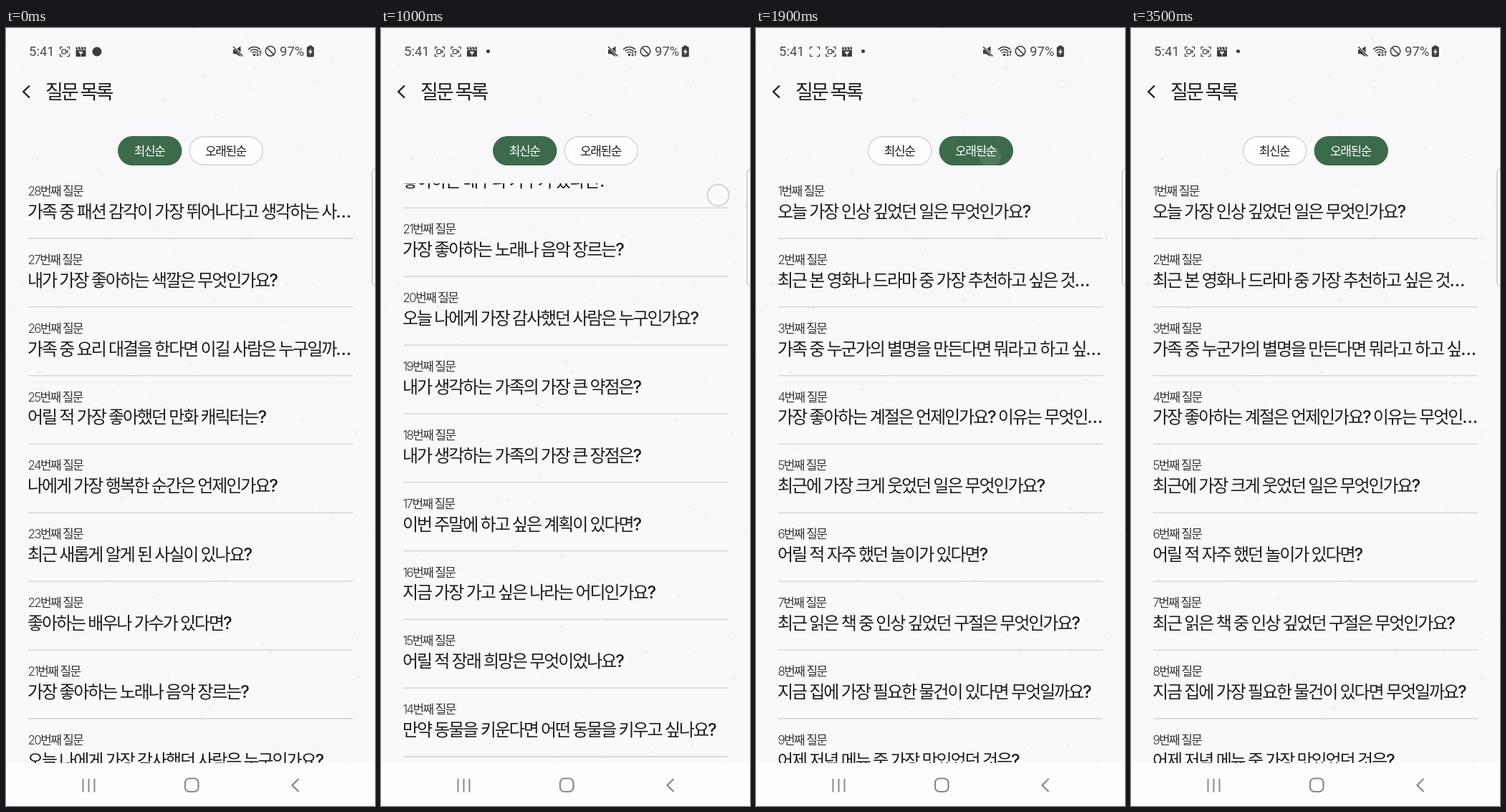
An HTML page with a canvas for the animation above (3700 ms loop, 515 px wide and 1087 px high).

```html
<!DOCTYPE html>
<html lang="ko">
<head>
<meta charset="utf-8">
<title>질문 목록</title>
<style>
  html, body { margin: 0; width: 100%; height: 100%; overflow: hidden; background: #f9f8fb; }
  canvas { display: block; width: 515px; height: 1087px; }
</style>
</head>
<body>
<canvas id="stage"></canvas>
<script>
const W = 515, H = 1087, LOOP = 3700, STEP = 100, PITCH = 95.82;
const SANS = 'Inter, "Noto Sans CJK KR", sans-serif';
const INK = '#1d1c20', ICON = '#3c3b3f', GREEN = '#3c6b4c', PAPER = '#f9f8fb';

const questions = [
  '오늘 가장 인상 깊었던 일은 무엇인가요?',
  '최근 본 영화나 드라마 중 가장 추천하고 싶은 것…',
  '가족 중 누군가의 별명을 만든다면 뭐라고 하고 싶…',
  '가장 좋아하는 계절은 언제인가요? 이유는 무엇인…',
  '최근에 가장 크게 웃었던 일은 무엇인가요?',
  '어릴 적 자주 했던 놀이가 있다면?',
  '최근 읽은 책 중 인상 깊었던 구절은 무엇인가요?',
  '지금 집에 가장 필요한 물건이 있다면 무엇일까요?',
  '어제 저녁 메뉴 중 가장 맛있었던 것은?',
  '가족 여행을 떠난다면 어디로 가고 싶나요?',
  '가장 기억에 남는 가족 여행지는?',
  '내가 가장 좋아하는 음식은 무엇인가요?',
  '가족 중 요리를 가장 잘한다고 생각하는 사람은?',
  '만약 동물을 키운다면 어떤 동물을 키우고 싶나요?',
  '어릴 적 장래 희망은 무엇이었나요?',
  '지금 가장 가고 싶은 나라는 어디인가요?',
  '이번 주말에 하고 싶은 계획이 있다면?',
  '내가 생각하는 가족의 가장 큰 장점은?',
  '내가 생각하는 가족의 가장 큰 약점은?',
  '오늘 나에게 가장 감사했던 사람은 누구인가요?',
  '가장 좋아하는 노래나 음악 장르는?',
  '좋아하는 배우나 가수가 있다면?',
  '최근 새롭게 알게 된 사실이 있나요?',
  '나에게 가장 행복한 순간은 언제인가요?',
  '어릴 적 가장 좋아했던 만화 캐릭터는?',
  '가족 중 요리 대결을 한다면 이길 사람은 누구일까…',
  '내가 가장 좋아하는 색깔은 무엇인가요?',
  '가족 중 패션 감각이 가장 뛰어나다고 생각하는 사…'
];

// [time, scroll offset]
const scroll = [[100, 0], [200, 30], [500, 294], [800, 540], [1000, 617.5], [1100, 560],
  [1300, 235], [1500, 0], [2000, 0], [2100, 90], [2300, 450], [2500, 640], [2600, 794.6],
  [2800, 930], [2900, 840], [3100, 380], [3300, 90], [3500, 0]];
// Finger strokes: [time, x, y]
const strokes = [
  [[100, 383, 850], [200, 384, 805], [500, 398, 537], [800, 444, 308], [1000, 470.5, 233.5],
    [1100, 460, 295], [1300, 415, 630], [1500, 383.5, 893]],
  [[1700, 327, 180], [1900, 327, 180]],
  [[2000, 385, 860], [2100, 390, 770], [2300, 412, 400]],
  [[2500, 400, 575], [2600, 414.5, 420], [2800, 430, 285], [2900, 425, 375], [3100, 395, 835]]
];

const canvas = document.getElementById('stage');
const ctx = canvas.getContext('2d');
const dpr = window.devicePixelRatio || 1;
canvas.width = W * dpr;
canvas.height = H * dpr;

function sample(keys, t) {
  if (t <= keys[0][0]) return keys[0].slice(1);
  for (let i = 1; i < keys.length; i++) {
    const a = keys[i - 1], b = keys[i];
    if (t <= b[0]) {
      const k = (t - a[0]) / (b[0] - a[0]);
      return a.slice(1).map((v, j) => v + (b[j + 1] - v) * k);
    }
  }
  return keys[keys.length - 1].slice(1);
}

function text(str, x, y, size, weight, spacing, color, align = 'left', family = SANS) {
  ctx.font = `${weight} ${size}px ${family}`;
  ctx.letterSpacing = spacing + 'px';
  ctx.textAlign = align;
  ctx.fillStyle = color;
  ctx.fillText(str, x, y);
}

function line(points, color, width, cap = 'butt') {
  ctx.beginPath();
  points.forEach(([x, y]) => ctx.lineTo(x, y));
  ctx.strokeStyle = color;
  ctx.lineWidth = width;
  ctx.lineCap = cap;
  ctx.lineJoin = 'miter';
  ctx.stroke();
}

function shape(points, color) {
  ctx.beginPath();
  points.forEach(([x, y]) => ctx.lineTo(x, y));
  ctx.closePath();
  ctx.fillStyle = color;
  ctx.fill();
}

function box(x, y, w, h, r, fill, stroke, width = 1) {
  ctx.beginPath();
  ctx.roundRect(x, y, w, h, r);
  if (fill) { ctx.fillStyle = fill; ctx.fill(); }
  if (stroke) { ctx.strokeStyle = stroke; ctx.lineWidth = width; ctx.stroke(); }
}

function arc(x, y, r, fill, stroke, width = 1, from = 0, to = Math.PI * 2) {
  ctx.beginPath();
  ctx.arc(x, y, r, from, to);
  if (fill) { ctx.fillStyle = fill; ctx.fill(); }
  if (stroke) { ctx.strokeStyle = stroke; ctx.lineWidth = width; ctx.lineCap = 'butt'; ctx.stroke(); }
}

function paper() {
  ctx.fillStyle = PAPER;
  ctx.fillRect(0, 0, W, H);
  let seed = 11;
  const rnd = () => (seed = (seed * 16807) % 2147483647) / 2147483647;
  for (let i = 0; i < 130; i++) {
    ctx.beginPath();
    ctx.ellipse(rnd() * W, rnd() * 1027, 0.8 + rnd() * 2.4, 0.6 + rnd() * 1.2, rnd() * 3, 0, 7);
    ctx.fillStyle = `rgba(190,186,176,${0.06 + rnd() * 0.12})`;
    ctx.fill();
  }
}

function captureIcon(x, y, filled) {
  for (const sx of [-1, 1]) for (const sy of [-1, 1]) {
    line([[x + 3 * sx, y + 6.5 * sy], [x + 6.5 * sx, y + 6.5 * sy], [x + 6.5 * sx, y + 3 * sy]], ICON, 1.2);
  }
  if (!filled) return;
  box(x - 4, y - 2.8, 5.6, 5.6, 1, null, ICON, 1.2);
  shape([[x + 1.8, y], [x + 4.6, y - 2.4], [x + 4.6, y + 2.4]], ICON);
}

function clipIcon(x, y) {
  box(x - 7, y - 6.5, 14, 3.4, 0.5, ICON);
  box(x - 7, y - 2.4, 14, 9.4, 1, ICON);
  for (const d of [-4, 0, 4]) line([[x + d - 1, y - 7], [x + d + 1, y - 2.6]], PAPER, 1.2);
  shape([[x, y + 4], [x - 3, y + 1], [x - 1.5, y - 0.8], [x, y + 0.5], [x + 1.5, y - 0.8], [x + 3, y + 1]], PAPER);
  line([[x, y + 3], [x, y + 6.5]], PAPER, 0.8);
}

function statusBar(t) {
  const roboto = 'Roboto, sans-serif', gray = '#4c4b4f';
  text('5:41', 32, 38.7, 18.5, 400, 0, gray, 'left', roboto);
  text('97%', 382, 38.7, 18.5, 400, 0, gray, 'left', roboto);
  const blinkOn = (t % 700) < 400;
  captureIcon(82, 33, blinkOn);
  if (t < 100) {
    clipIcon(104.5, 33);
    arc(127, 33, 6.5, ICON);
  } else {
    captureIcon(104.5, 33, true);
    clipIcon(127, 33);
    arc(149.5, 32.5, 2.5, ICON);
  }

  // Muted speaker
  shape([[317, 30], [320.5, 30], [327.5, 25.5], [327.5, 40], [320.5, 36], [317, 36]], ICON);
  line([[317, 25.5], [331, 40]], PAPER, 3.2);
  line([[317, 26], [330.5, 39.5]], ICON, 1.5);

  // Wireless signal with data arrows
  for (const r of [4.5, 8, 11.5]) arc(346.5, 38, r, null, ICON, 1.5, Math.PI * 1.24, Math.PI * 1.76);
  arc(346.5, 37.5, 1.8, ICON);
  line([[351.2, 32], [351.2, 39]], PAPER, 3);
  line([[351.2, 32], [351.2, 39]], ICON, 1.2);
  line([[349.5, 37], [351.2, 39.2], [353, 37]], ICON, 1);
  line([[355, 39], [355, 32]], ICON, 1.2);
  line([[353.3, 34], [355, 31.8], [356.8, 34]], ICON, 1);

  arc(369, 32.3, 6.8, null, ICON, 1.6);
  line([[364.2, 27.5], [373.8, 37.1]], ICON, 1.6);

  box(422.5, 24.5, 4.5, 3, 0.5, ICON);
  box(419.8, 26, 10, 14.5, 1.8, ICON);
  shape([[425.8, 28.3], [421.8, 34], [424.4, 34], [423.6, 38.2], [427.8, 32.2], [425.2, 32.2]], PAPER);
}

function pill(label, x, w, active) {
  if (active) box(x, 151, w, 41, 20.5, GREEN);
  else box(x + 0.7, 151.7, w - 1.4, 39.6, 19.8, '#fefdff', '#d3d2d5', 1.4);
  text(label, x + w / 2 - 0.7, 177.8, 17, 500, -1.4, active ? '#ffffff' : INK, 'center');
}

function list(offset, oldest) {
  ctx.save();
  ctx.beginPath();
  ctx.rect(0, 217, W, 811);
  ctx.clip();
  for (let i = 0; i < questions.length; i++) {
    const y = i * PITCH - offset;
    if (y < -100 || y > 820) continue;
    const n = oldest ? i + 1 : questions.length - i;
    text(n + '번째 질문', 30.5, y + 234.2, 17, 300, -1.64, '#333236');
    text(questions[n - 1], 30, y + 265, 24, 500, -2.08, INK);
    line([[31, y + 294], [484, y + 294]], '#d1d0d3', 1.3);
  }
  ctx.restore();
}

function navBar() {
  const gray = '#89888b';
  ctx.fillStyle = '#fdfcfe';
  ctx.fillRect(0, 1027, W, 60);
  for (const x of [107.5, 115.5, 123.5]) line([[x, 1049], [x, 1067.5]], gray, 2);
  box(250, 1048.5, 18.5, 18.5, 6, null, gray, 2.2);
  line([[408.5, 1049], [399.5, 1058], [408.5, 1067]], gray, 2.2);
}

function finger(t) {
  const stroke = strokes.find(s => t >= s[0][0] && t <= s[s.length - 1][0]);
  if (!stroke) return;
  const [x, y] = sample(stroke, t);
  if (y < 192 && t >= 1800) arc(x, y, 15, 'rgba(255,255,255,0.1)');
  else arc(x, y, 15, 'rgba(250,249,252,0.65)', '#d3d2d5', 2);
}

function draw(t) {
  const oldest = t >= 1800;
  ctx.setTransform(dpr, 0, 0, dpr, 0, 0);
  paper();
  statusBar(t);
  line([[33, 80.5], [24.2, 89], [33, 97.5]], INK, 2.3);
  text('질문 목록', 55, 98.5, 27, 500, -2.8, INK);
  pill('최신순', 156, 89.5, !oldest);
  pill('오래된순', 255.5, 103.5, oldest);
  list(sample(scroll, t)[0], oldest);
  navBar();
  box(511, 197, 12, 163, 5, '#fdfcfe', '#aaa9ac', 1);
  finger(t);
}

let last = -1;
function tick() {
  const t = Math.min(3500, Math.floor((performance.now() % LOOP) / STEP) * STEP);
  if (t !== last) draw(last = t);
  requestAnimationFrame(tick);
}
tick();
</script>
</body>
</html>
```
